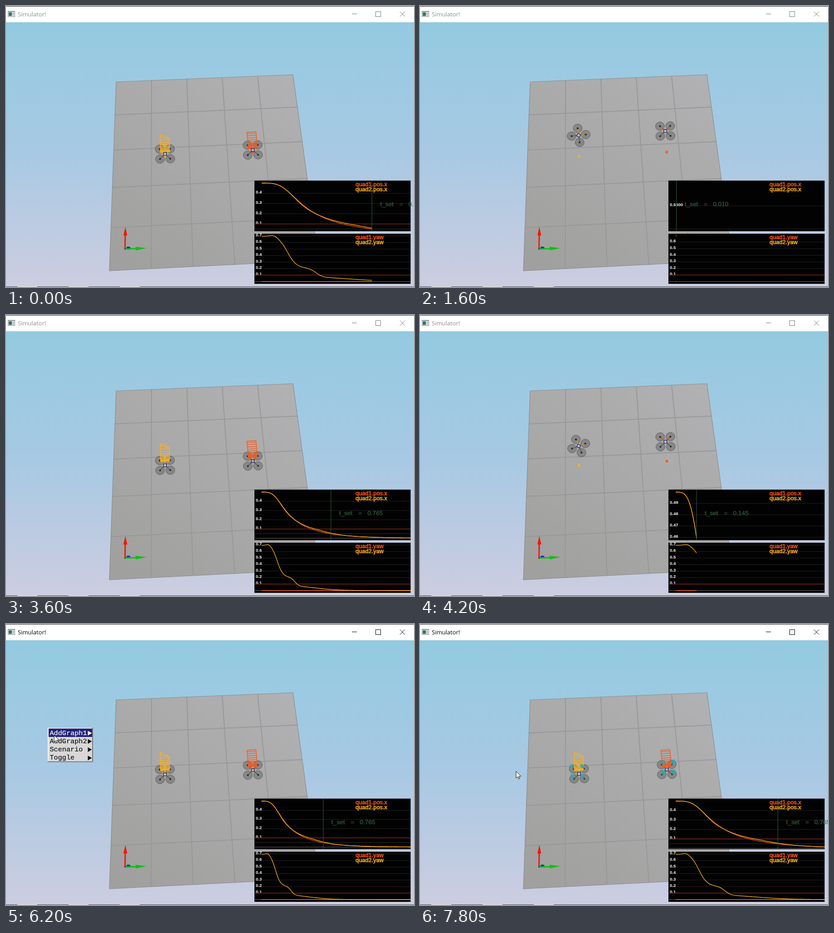
These frames come from a looping animation (900 by 622 pixels, 8000 ms). An HTML page with a canvas:

```html
<!DOCTYPE html>
<html lang="en">
<head>
<meta charset="utf-8">
<title>Simulator!</title>
<style>
html, body { margin: 0; width: 100%; height: 100%; overflow: hidden; background: #cdcde0; }
canvas { display: block; }
</style>
</head>
<body>
<canvas id="stage" width="900" height="622"></canvas>
<script>
const ctx = document.getElementById('stage').getContext('2d');
const LOOP = 8000, STEP = 200;
const ORANGE = '#ff5514', YELLOW = '#ffb31a', RED = '#a8321c', GRID = '#222';
const SANS = '"Liberation Sans", Arial, sans-serif';
const MONO = '"Liberation Mono", monospace';

const bump = (t, center, width) => Math.exp(-(((t - center) / width) ** 2));
const drop = (t, center, width) => 1 / (1 + Math.exp((t - center) / width));
const ramp = (t, from, to) => Math.min(Math.max((t - from) / (to - from), 0), 1);

// Responses of both quads: slow start, then exponential approach to zero.
const pos1 = t => .5 * Math.exp(-3.15 * t ** 4 / (t ** 3 + .0135));
const pos2 = t => pos1(t) + .014 * bump(t, .62, .18) - .008 * bump(t, .28, .07);
const yaw1 = () => 0;
const yaw2 = t => .485 * drop(t, .178, .03) + .135 * drop(t, .37, .022)
  + .08 * drop(t, .6, .13) + .025 * bump(t, .085, .035);

// Each simulation run: start in ms, simulated seconds per ms.
const runs = [[-911, .00082], [1588, .000815], [4029, .000848], [6372, .00078]];
function simTime(ms) {
  const [start, rate] = runs.filter(run => run[0] <= ms).pop();
  return (ms - start) * rate;
}

function line(color, width, ...pts) {
  ctx.strokeStyle = color;
  ctx.lineWidth = width;
  ctx.beginPath();
  pts.forEach(p => ctx.lineTo(...p));
  ctx.stroke();
}
function poly(fill, ...pts) {
  ctx.fillStyle = fill;
  ctx.beginPath();
  pts.forEach(p => ctx.lineTo(...p));
  ctx.closePath();
  ctx.fill();
}
function box(fill, x, y, w, h) {
  ctx.fillStyle = fill;
  ctx.fillRect(x, y, w, h);
}
function disc(fill, x, y, rx, ry = rx) {
  ctx.fillStyle = fill;
  ctx.beginPath();
  ctx.ellipse(x, y, rx, ry, 0, 0, 2 * Math.PI);
  ctx.fill();
}
function text(str, x, y, font, color, weight = 0) {
  ctx.font = font;
  ctx.fillStyle = ctx.strokeStyle = color;
  ctx.fillText(str, x, y);
  if (weight) {
    ctx.lineWidth = weight;
    ctx.strokeText(str, x, y);
  }
}
function gradient(x0, y0, x1, y1, ...colors) {
  const g = ctx.createLinearGradient(x0, y0, x1, y1);
  colors.forEach((color, i) => g.addColorStop(i / (colors.length - 1), color));
  return g;
}

function drawWindow(active) {
  box('#fff', 0, 0, 900, 36);
  box('#20242c', 0, 0, 900, 1);
  box('#8a8f94', 4, 11, 16, 13);
  box('#eef2f4', 5, 13, 14, 10);
  box('#2f7a5c', 6, 14, 7, 8);
  box('#b9c6cc', 14, 14, 4, 8);
  text('Simulator!', 26, 22.5, '13px "Open Sans", sans-serif', active ? '#000' : '#8c8c8c');
  const ink = active ? '#000' : '#777';
  line(ink, 1, [763, 17.5], [774, 17.5]);
  ctx.strokeRect(815.5, 12.5, 11, 11);
  line(ink, 1, [869, 12.5], [880, 23.5]);
  line(ink, 1, [880, 12.5], [869, 23.5]);
}

// Perspective mapping of the unit square onto the floor.
function floorPoint(u, v) {
  const k = .846, w = 1 - v + k * v;
  const mix = (a, b) => a + (b - a) * u;
  return [(mix(243, 633) * (1 - v) + mix(228, 689.5) * k * v) / w,
          (mix(168, 152) * (1 - v) + mix(586, 563) * k * v) / w];
}

function drawScene() {
  box(gradient(0, 36, 0, 622, '#93cae1', '#a8c9e3', '#cdcde0'), 0, 36, 900, 586);
  const corners = [[0, 0], [1, 0], [1, 1], [0, 1], [0, 0]].map(c => floorPoint(...c));
  poly(gradient(600, 150, 300, 590, '#b1b0b2', '#a9a9a9', '#a0a09f'), ...corners);
  for (let i = 1; i < 5; i++) {
    line('#989898', 2, floorPoint(i / 5, 0), floorPoint(i / 5, 1));
    line('#989898', 2, floorPoint(0, i / 5), floorPoint(1, i / 5));
  }
  line('#8c8c8c', 1.2, ...corners);

  line('#f01808', 3, [262.5, 538], [263, 506]);
  poly('#f01808', [259, 508], [263.3, 489], [267.5, 508]);
  disc('#1838b0', 270, 535, 4.5, 2.5);
  line('#10c010', 3, [262, 538], [288, 537]);
  poly('#10c010', [286, 533], [310, 536], [286, 541]);
  box('#444', 261, 536, 3, 3);

  box('#4a4c54', 0, 621, 900, 1);
  for (let i = 0; i < 3; i++) box('#e2ddd8', 25 + i * 113, 620.5, 44, 1.5);
}

const quads = [
  { goal: [350.8, 333], startX: 350, pos: pos2, yaw: yaw2, color: YELLOW, arm: '#d9971f', thrust: [-8, -11.5] },
  { goal: [544.5, 323.5], startX: 541, pos: pos1, yaw: yaw1, color: ORANGE, arm: '#dd5a1c', thrust: [7, -12] }
];
const square = r => [0, 1, 2, 3].map(i => {
  const a = (i * 2 - 3) * Math.PI / 4 - .03;
  return [r * Math.cos(a), r * .97 * Math.sin(a)];
});
const rotors = square(16), frame = square(4.8);

// Returns a function from quad coordinates to the stage.
function pose(quad, t) {
  const v = quad.pos(t), yaw = quad.yaw(t);
  const angle = yaw * (yaw / .7) ** 1.5;
  const x = quad.goal[0] + (quad.startX - quad.goal[0]) * (2 * v) ** 1.5;
  const y = quad.goal[1] - 93.5 * v;
  const c = Math.cos(angle), s = Math.sin(angle);
  return ([dx, dy], k = 1) => [x + (dx * c - dy * s) * k, y + (dx * s + dy * c) * k];
}

function drawThrust([x, y], [dx, dy]) {
  const bx = x + dx * .35, by = y + dy * .35;
  line('#129aa5', 2.5, [x, y], [x + dx * .5, y + dy * .5]);
  poly('#18b4c0', [bx - dy * .3, by + dx * .3], [x + dx, y + dy], [bx + dy * .3, by - dx * .3]);
}

function drawQuad(quad, t, thrusts) {
  const place = pose(quad, t);
  disc(quad.color, ...quad.goal, 2.6, 2.9);
  rotors.forEach((r, i) => {
    const hub = place(r);
    disc('rgba(105,105,105,.55)', ...hub, 10, 9.6);
    ctx.strokeStyle = 'rgba(80,80,80,.7)';
    ctx.lineWidth = 1;
    ctx.stroke();
    line('rgba(60,60,60,.8)', 1.2, place(r, .3), hub);
    if (i < 2) line(quad.arm, 2, place(r, .35), place(r, .8));
    disc('#222', ...hub, 1.9);
  });

  const left = [], right = [];
  for (let s = .12; s < Math.min(t - .1, .62); s += .04) {
    const at = pose(quad, s), a = at([-10, .8]), b = at([10, -.8]);
    left.push(a);
    right.push(b);
    line(quad.color, 1.3, a, b);
  }
  line(quad.color, 1.4, ...left);
  line(quad.color, 1.4, ...right);

  const body = [...frame, frame[0]].map(p => place(p));
  poly('rgba(190,194,208,.7)', ...body);
  line('#2b3068', 1.5, ...body);
  if (thrusts) rotors.forEach(r => drawThrust(place(r), quad.thrust));
}

function rule(y, color) {
  line(color, 1, [549, y], [892, y]);
}
function tick(value, y, digits) {
  rule(y, GRID);
  text(value.toFixed(digits), 551, y + .7, 'bold 9.5px ' + SANS, '#f4f4f4');
}
function legend(name, y) {
  [ORANGE, YELLOW].forEach((color, i) =>
    text(`quad${i + 1}.${name}`, 771, y + i * 11.4, '12.85px ' + SANS, color, .6));
}
function curve(fn, color, t, xOf, yOf) {
  const pts = [];
  for (let i = 0; i <= 160; i++) {
    const s = .005 + (t - .005) * i / 160;
    pts.push([xOf(s), yOf(fn(s))]);
  }
  line(color, 1.3, ...pts);
}

function drawPosPlot(t, xOf) {
  box('#020203', 548, 386.5, 344.5, 112);
  const range = .5 - Math.min(pos1(t), pos2(t));
  const yOf = v => 392 + (.5 - v) / range * 101.5;
  if (range < .001) {
    rule(493.5, GRID);
    tick(.5, 442.3, 4);
  } else {
    const power = Math.floor(Math.log10(range)), step = 10 ** power;
    for (let v = .5 - step; v > .5 - range && v > step / 2; v -= step) tick(v, yOf(v), -power);
    [[.1, RED], [.05, '#30302a'], [0, '#6e675f']].forEach(([v, color]) => {
      if (yOf(v) < 498) rule(yOf(v), color);
    });
    curve(pos1, ORANGE, t, xOf, yOf);
    curve(pos2, YELLOW, t, xOf, yOf);
  }
  legend('pos.x', 398.7);

  const settled = Math.min(t, .765), mark = xOf(settled);
  line('#2e512f', 1.2, [mark, 387], [mark, 498]);
  const label = (str, dx) => text(str, mark + dx, 443, '13.7px ' + SANS, 'rgba(56,104,66,.85)', .3);
  label('t_set', 18);
  label('=', 60.5);
  label((Math.round(settled * 200) / 200).toFixed(3), 80.5);
}

function drawYawPlot(t, xOf) {
  box('#020203', 548, 504, 344.5, 111);
  const top = yaw2(Math.min(t, .08));
  const yOf = v => 610 - v / top * 101.5;
  for (let v = .1; v < top; v += .1) tick(v, yOf(v), 1);
  rule(yOf(.1), RED);
  rule(610, '#77736f');
  curve(yaw1, ORANGE, t, xOf, yOf);
  curve(yaw2, YELLOW, t, xOf, yOf);
  legend('yaw', 515.8);
}

function drawMenu(x, y, width, items, selected, arrows) {
  const height = items.length * 18.3 + 3;
  box('#777', x, y, width, height);
  box('#f6f6f6', x, y, width - 2, height - 2);
  box('#d8d8d8', x + 2, y + 2, width - 4, height - 4);
  items.forEach((name, i) => {
    const base = y + 16 + i * 18.3, on = i === selected, ink = on ? '#fff' : '#111';
    if (on) box('#21217a', x + 2, base - 14, width - 4, 18.5);
    text(name, x + 4.5, base, '15.2px ' + MONO, ink, .2);
    const tip = x + width - 2.5;
    if (arrows) poly(ink, [tip - 9, base - 9], [tip, base - 4], [tip - 9, base + 1.5]);
  });
}

function drawPointer(ms) {
  const toToggle = ramp(ms, 6000, 6800), toThrusts = ramp(ms, 7000, 7400);
  const x = 93 + 53 * toToggle + 66 * toThrusts;
  const y = 229 + 68 * toToggle + 29 * toThrusts;
  const shape = [[0, 0], [0, 15], [3.5, 12], [6, 17], [8, 16], [5.8, 11.2], [10.5, 11], [0, 0]]
    .map(([dx, dy]) => [x + dx, y + dy]);
  poly('#fff', ...shape);
  line('#111', 1, ...shape);
}

function render(now) {
  const ms = Math.floor(now % LOOP / STEP) * STEP;
  const t = simTime(ms);
  const xScale = 330.5 / Math.max(t, 1.009);
  const xOf = s => 562.5 + s * xScale;

  drawScene();
  quads.forEach(quad => drawQuad(quad, t, ms >= 7600));
  drawPosPlot(t, xOf);
  drawYawPlot(t, xOf);
  drawWindow(ms >= 5800);
  if (ms >= 5800 && ms < 7600) {
    const row = Math.min((ms - 6200) / 200, 3);
    drawMenu(92, 229.5, 100, ['AddGraph1', 'AddGraph2', 'Scenario', 'Toggle'], row, true);
    if (row === 3) {
      const items = ['ActualTrajectory', 'RefTrajectory', 'Thrusts'];
      drawMenu(192, 284, 154.5, items, ms >= 7400 ? 2 : -1, false);
    }
  }
  if (ms >= 5200) drawPointer(ms);
}

const began = performance.now();
function play() {
  render(performance.now() - began);
  requestAnimationFrame(play);
}
play();
</script>
</body>
</html>
```
